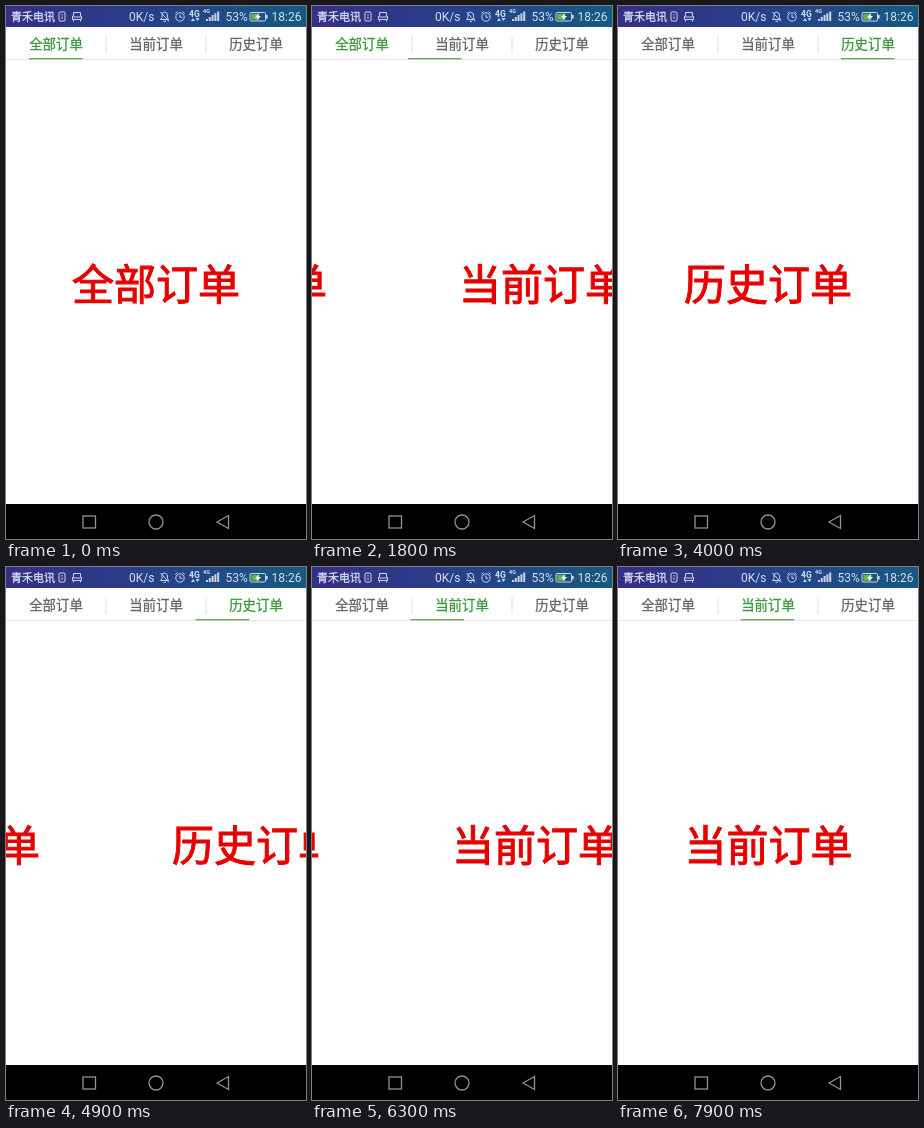
These frames come from a looping animation (300x533 px, 8 s). An HTML page:

```html
<!DOCTYPE html>
<html lang="zh-CN">
<head>
<meta charset="utf-8">
<title>订单</title>
<style>
  html, body { margin: 0; width: 100%; height: 100%; overflow: hidden; background: #fff; }
  svg { display: block; width: 300px; height: 533px; }
  text { font-family: "Noto Sans CJK SC", "Noto Sans CJK", "Noto Sans CJK JP", sans-serif; }
  .status text { font: 12px Roboto, sans-serif; fill: #d9deef; }
  .status .carrier {
    font: 11px "Noto Sans CJK SC", "Noto Sans CJK", "Noto Sans CJK JP", sans-serif;
    stroke: #d9deef; stroke-width: .3;
  }
  .status .net { font-size: 8.5px; font-weight: 700; }
  .status .mini { font-size: 5.5px; font-weight: 700; }
  .line { fill: none; stroke: #cdd3e8; }
  .solid { fill: #cdd3e8; }
  .tabs text { font-size: 13.4px; text-anchor: middle; fill: #666; stroke: #666; stroke-width: .3; }
  .tabs text.on { fill: #3a973c; stroke: #3a973c; }
  .pages text { font-size: 42px; text-anchor: middle; fill: #e60000; stroke: #e60000; stroke-width: 1; }
  .nav { fill: none; stroke: #97928a; stroke-width: 1.3; }
</style>
</head>
<body>
<svg viewBox="0 0 300 533">
  <defs>
    <linearGradient id="bar">
      <stop offset="0" stop-color="#352f85"/>
      <stop offset=".5" stop-color="#27408a"/>
      <stop offset="1" stop-color="#155a80"/>
    </linearGradient>
  </defs>
  <rect width="300" height="533" fill="#fff"/>

  <g class="pages" id="pages">
    <text x="150" y="294">全部订单</text>
    <text x="450" y="294">当前订单</text>
    <text x="750" y="294">历史订单</text>
  </g>

  <g class="tabs">
    <path d="M0 53.5H300" stroke="#e4e6ee"/>
    <path d="M100 30V47M200 30V47" stroke="#dde0ec"/>
    <text x="50" y="43">全部订单</text>
    <text x="150" y="43">当前订单</text>
    <text x="250" y="43">历史订单</text>
    <rect id="mark" x="23" y="52" width="53.5" height="1.4" fill="#76a562"/>
  </g>

  <g class="status">
    <rect width="300" height="21" fill="url(#bar)"/>
    <text class="carrier" x="5" y="15">青禾电讯</text>
    <rect class="line" x="53" y="6" width="6" height="9" rx="1"/>
    <path class="line" d="M56 8V9.5M56 10.5V13"/>
    <path class="line" d="M67.5 10V6.5H74.5V10M66.5 11H75.5M66.5 10V13.5H75.5V10M67.5 13.5V15.5M74.5 13.5V15.5"/>
    <text x="123" y="15">0K/s</text>
    <path class="line" d="M154.500 13.500H162.500L161.500 11.500V9Q161 6 158.500 6T156 9V11.500ZM157.500 15.300H160M154.500 6L163 15.500"/>
    <circle class="line" cx="174" cy="11" r="4.2"/>
    <path class="line" d="M174 8.500V11.300H176.300M169.300 7.500L171.500 5.600M178.700 7.500L176.500 5.600"/>
    <text class="net" x="183" y="10.500">4G</text>
    <path class="solid" d="M185 15L187 12L189 15ZM189.500 12H193.500L191.500 15Z"/>
    <text class="mini" x="197" y="7">4G</text>
    <path class="solid" d="M200 13h2v2h-2zM202.800 11h2v4h-2zM205.600 9h2v6h-2zM208.400 7.300h2v7.700h-2zM211.200 5.500h2v9.500h-2z"/>
    <text x="219.500" y="15">53%</text>
    <rect class="line" x="244" y="6.500" width="15.500" height="8.500" rx="1"/>
    <rect x="245.300" y="7.800" width="8" height="5.900" fill="#62b847"/>
    <path class="solid" d="M260 9h1.700v3.500h-1.700z"/>
    <path fill="#fff" d="M253 7L249 11.500H251.500L250.500 14.500L255 10H252.300Z"/>
    <text x="265.500" y="15">18:26</text>
  </g>

  <rect y="498" width="300" height="35" fill="#000"/>
  <g class="nav">
    <rect x="77" y="510" width="12.500" height="12"/>
    <circle cx="150" cy="516" r="7"/>
    <path d="M211 516L222.500 509.500V522.500Z"/>
  </g>
</svg>
<script>
  const LOOP = 8000, STEP = 100, SETTLE = 600;

  // Each swipe: finger down, finger up, page at start, page at release, page to snap to
  const swipes = [
    [900, 1900, 0, 0.811, 1],
    [2300, 3500, 1, 1.634, 2],
    [4300, 5100, 2, 1.556, 1],
    [5800, 6400, 1, 0.704, 0],
    [6900, 7500, 0, 0.5, 1]
  ];

  const pages = document.getElementById("pages");
  const mark = document.getElementById("mark");
  const tabs = document.querySelectorAll(".tabs text");
  const mix = (a, b, u) => a + (b - a) * u;
  const easeOut = u => 1 - (1 - u) ** 5;

  function stateAt(t) {
    const swipe = swipes.filter(s => s[0] <= t).pop();
    if (!swipe) return { pos: 0, tab: 0 };
    const [down, up, from, drop, to] = swipe;
    if (t <= up) return { pos: mix(from, drop, (t - down) / (up - down)), tab: from };
    return { pos: mix(drop, to, easeOut(Math.min(1, (t - up) / SETTLE))), tab: to };
  }

  function draw(t) {
    const { pos, tab } = stateAt(t);
    pages.setAttribute("transform", `translate(${-300 * pos} 0)`);
    mark.setAttribute("x", 23 + 100 * pos);
    tabs.forEach((el, i) => el.classList.toggle("on", i === tab));
  }

  const start = performance.now();
  function tick() {
    const t = (performance.now() - start) % LOOP;
    draw(Math.floor(t / STEP) * STEP);
    requestAnimationFrame(tick);
  }
  tick();
</script>
</body>
</html>
```
